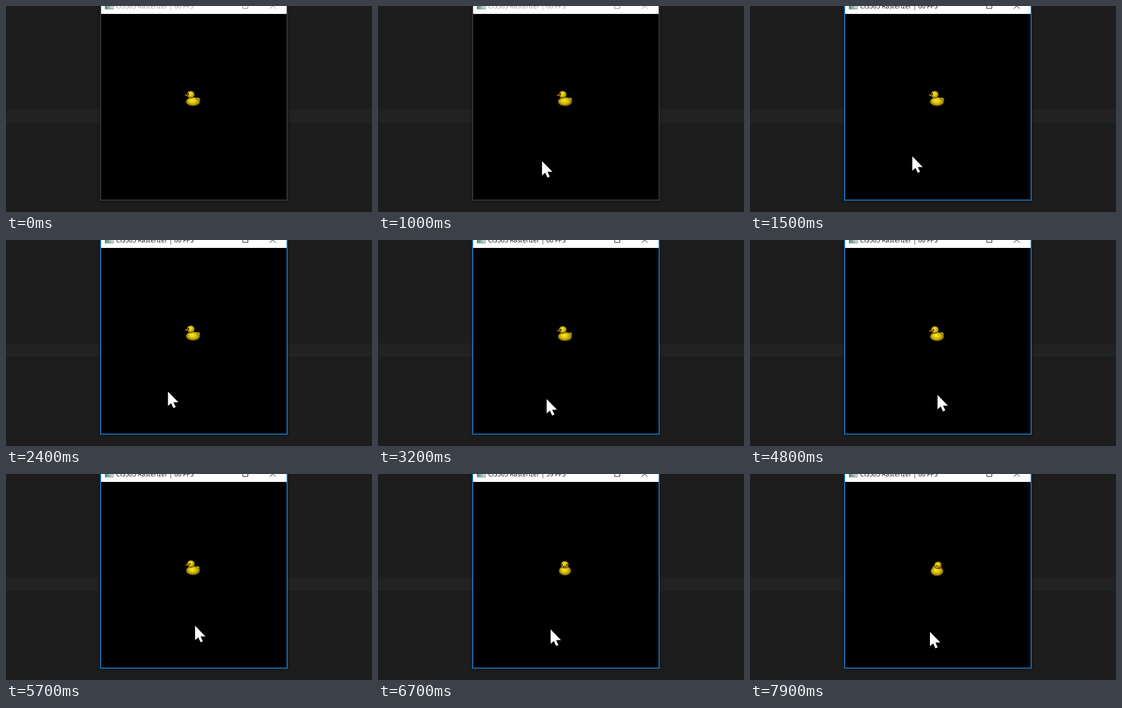
These frames come from a looping animation (600 by 338 pixels, 8 s). An HTML page with a canvas:

```html
<!DOCTYPE html>
<html lang="en">
<head>
<meta charset="utf-8">
<title>Rasterizer</title>
<style>
  html, body { margin: 0; width: 100%; height: 100%; overflow: hidden; background: #1d1d1d; }
  #stage { position: relative; width: 600px; height: 338px; overflow: hidden; }
  svg, canvas { position: absolute; left: 0; top: 0; }
  #win { fill: #000; stroke: #3c3c3c; stroke-width: 1.6; filter: drop-shadow(0 1px 3px rgba(0, 0, 0, .4)); }
  #title { fill: #999; font: 10.4px "Open Sans", "Noto Sans", sans-serif; }
  #icons { stroke: #8a8a8a; fill: none; }
  .active #win { stroke: #1a80d2; }
  .active #title { fill: #111; }
  .active #icons { stroke: #222; }
</style>
</head>
<body>
<div id="stage">
  <svg id="desk" width="600" height="338">
    <defs>
      <linearGradient id="green"><stop stop-color="#3b8f70"/><stop offset="1" stop-color="#dfe6e2"/></linearGradient>
    </defs>
    <rect width="600" height="338" fill="#1d1d1d"/>
    <rect y="169.500" width="600" height="21.500" fill="#222"/>
    <rect y="189.500" width="600" height="1" fill="#242a28"/>
    <rect id="win" x="155.200" y="-20" width="305.600" height="338.500"/>
    <rect x="156" width="304" height="13" fill="#fff"/>
    <rect x="162.500" y="-6" width="13.500" height="11" fill="url(#green)" stroke="#8c8c8c"/>
    <text id="title" x="180.500" y="4"></text>
    <g id="icons">
      <path d="M343 -.5h10" opacity=".4"/>
      <path d="M388 -5h8.500v9h-8.500zM432.500 -5l9.500 9.500M442 -5l-9.500 9.500"/>
    </g>
  </svg>
  <canvas id="duck" width="600" height="338"></canvas>
  <svg width="600" height="338">
    <path id="cursor" d="M0 0V23.500L5.200 19L9 27L12.700 25.400L9 17.500H17Z" fill="#fff"/>
  </svg>
</div>
<script>
const LOOP = 8000, STEP = 100;
const el = id => document.getElementById(id);
const ctx = el('duck').getContext('2d');

// Turning points of the pointer: time, x, y
const pointer = [
  [300, 296, 307], [1100, 265, 247], [2200, 268, 246], [3100, 257, 258], [3200, 276.5, 261],
  [3600, 304, 261], [5700, 310, 249], [6500, 271, 254], [6700, 283, 255], [7400, 268, 257], [7900, 295, 259]
];

const gold = ['#fae83c', '#e2c80c', '#a08a04', '#2c2400'];
const orange = ['#e07a1c', '#bf5512', '#7a300a', '#2a1002'];
const dark = ['#2a2208', '#151000', '#0a0800', '#0a0800'];
const eye = side => ({ at: [-7.6, -12.7, 3.9 * side], size: [1.1, 1.2, 1.1], colors: dark });

// Ellipsoids; the duck faces -x, y points down, z towards the viewer
const parts = [
  { at: [8, -2.8, 0], size: [3.8, 4, 4], colors: gold },
  { at: [0, 0, 0], size: [11.7, 7.4, 10.2], colors: gold },
  { at: [-3.7, -11.6, 0], size: [6.4, 6.1, 6.4], colors: gold },
  { at: [-10.6, -10.4, 0], size: [3.2, 1.5, 2.8], colors: orange },
  eye(1), eye(-1)
];

function ramp(t, from, to) {
  return Math.min(1, Math.max(0, (t - from) / (to - from)));
}

function pointerAt(t) {
  let [, x, y] = pointer[0];
  for (let i = 1; i < pointer.length; i++) {
    const [from, x0, y0] = pointer[i - 1], [to, x1, y1] = pointer[i];
    const u = ramp(t, from, to);
    x += (x1 - x0) * u;
    y += (y1 - y0) * u;
  }
  return [x, y];
}

function blob({ x, y, w, h, colors }) {
  ctx.save();
  ctx.translate(x, y);
  ctx.scale(w, h);
  const g = ctx.createRadialGradient(-.15, -.3, 0, 0, -.05, 1.05);
  [0, .45, .82, 1].forEach((stop, i) => g.addColorStop(stop, colors[i]));
  ctx.fillStyle = g;
  ctx.beginPath();
  ctx.arc(0, 0, 1, 0, 7);
  ctx.fill();
  ctx.restore();
}

function drawDuck(t) {
  const yaw = 25 * ramp(t, 1500, 5700) + 58 * ramp(t, 5700, 6700) + 35 * ramp(t, 6700, 7900);
  const pitch = 12 * ramp(t, 1500, 3200) + 8 * ramp(t, 5700, 7900);
  const rad = Math.PI / 180;
  const c = Math.cos(yaw * rad), s = Math.sin(yaw * rad);
  const cp = Math.cos(pitch * rad), sp = Math.sin(pitch * rad);
  const project = ({ at: [x, y, z], size: [rx, ry, rz], colors }) => {
    const depth = z * c - x * s;
    return {
      depth, colors,
      x: 306.6 + x * c + z * s,
      y: 157 + .13 * pitch + y * cp + depth * sp,
      w: Math.hypot(rx * c, rz * s),
      h: Math.hypot(ry * cp, Math.hypot(rx * s, rz * c) * sp)
    };
  };
  ctx.clearRect(280, 130, 50, 50);
  parts.map(project).sort((a, b) => a.depth - b.depth).forEach(blob);
}

function render(now) {
  const t = Math.floor(now % LOOP / STEP) * STEP;
  const [x, y] = pointerAt(t);
  const fps = t >= 6100 && t < 7100 ? 59 : 60;
  el('cursor').setAttribute('transform', `translate(${x} ${y})`);
  el('cursor').setAttribute('visibility', t < 300 ? 'hidden' : 'visible');
  el('desk').classList.toggle('active', t >= 1300);
  el('title').textContent = `CIS565 Rasterizer | ${fps} FPS`;
  drawDuck(t);
}

const start = performance.now();
function tick() {
  render(performance.now() - start);
  requestAnimationFrame(tick);
}
tick();
</script>
</body>
</html>
```
